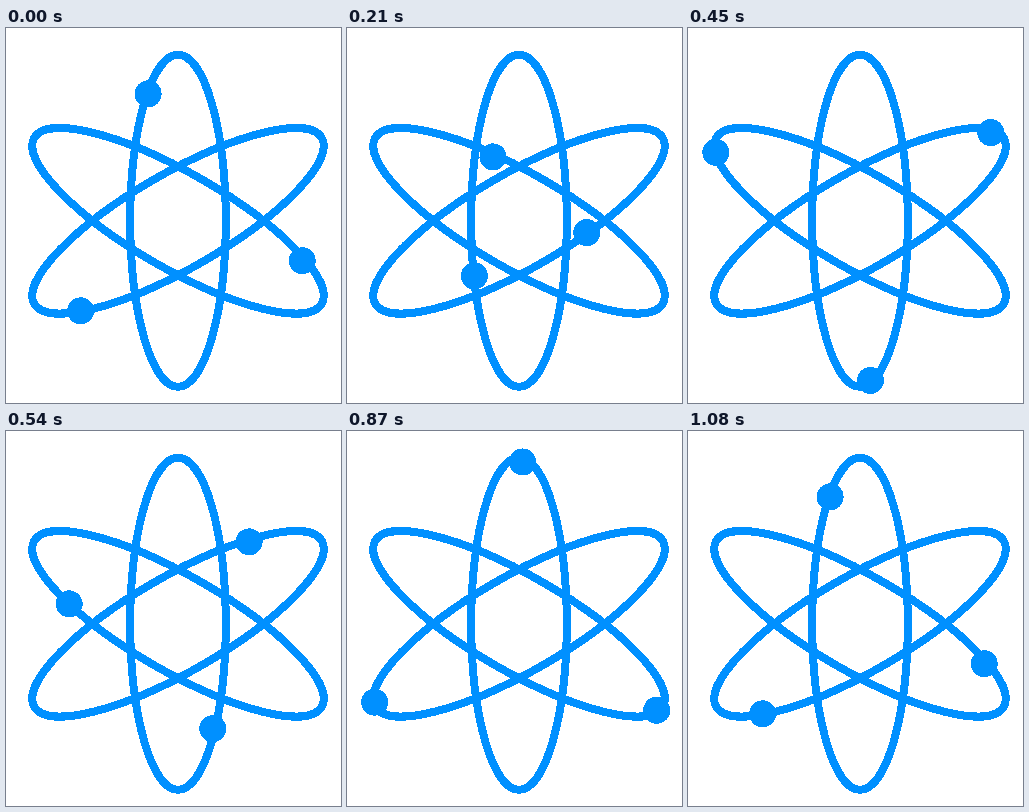
Animation, 335 px wide and 375 px high, one loop 1.11 s. Source, as an HTML page:

```html
<!DOCTYPE html>
<html lang="en">
<head>
<meta charset="utf-8">
<title>Atom</title>
<style>
  html, body { margin: 0; width: 100%; height: 100%; overflow: hidden; background: #fff; }
  svg { display: block; width: 335px; height: 375px; shape-rendering: crispEdges; }
</style>
</head>
<body>
<svg id="stage" viewBox="0 0 335 375"></svg>
<script>
const COLOR = '#0090ff';
const STEP = 30, LOOP = 1110, TURN = 36;
const TILTS = [0, 120, 240];
const ORBIT = { x: 172, y: 192.8, rx: 47.8, ry: 166 };
const TRACK = { x: 171, y: 193.8, rx: 46.3, ry: 163.7 };

// Electron phase in degrees at a few steps of one turn.
const KEYS = [[0, 38.6], [7, 109.3], [11, 150.4], [18, 230.6], [23, 300.2], [29, 354.2]];

const stage = document.getElementById('stage');

function add(parent, tag, attrs) {
  const node = document.createElementNS('http://www.w3.org/2000/svg', tag);
  for (const name in attrs) node.setAttribute(name, attrs[name]);
  return parent.appendChild(node);
}

function tilted({ x, y }, tilt) {
  return add(stage, 'g', { transform: `translate(${x} ${y}) rotate(${tilt})` });
}

const electrons = TILTS.map(tilt => {
  add(tilted(ORBIT, tilt), 'ellipse', {
    rx: ORBIT.rx, ry: ORBIT.ry, fill: 'none', stroke: COLOR, 'stroke-width': 8
  });
  return add(tilted(TRACK, tilt), 'circle', { r: 13.5, fill: COLOR });
});

// Keys repeat every turn, each time 360 degrees further.
function key(i) {
  const turns = Math.floor(i / KEYS.length);
  const [step, phase] = KEYS[i - turns * KEYS.length];
  return [step + turns * TURN, phase + turns * 360];
}

function slope(i) {
  const [a, b] = [key(i), key(i + 1)];
  return (b[1] - a[1]) / (b[0] - a[0]);
}

function tangent(i) {
  const before = key(i)[0] - key(i - 1)[0];
  const after = key(i + 1)[0] - key(i)[0];
  return (slope(i - 1) * after + slope(i) * before) / (before + after);
}

function phaseAt(step) {
  let i = 0;
  while (key(i + 1)[0] <= step) i++;
  const [start, from] = key(i), [end, to] = key(i + 1);
  const span = end - start, s = (step - start) / span;
  const ease = s * s * (3 - 2 * s);
  return from + (to - from) * ease
    + span * s * (1 - s) * (tangent(i) * (1 - s) - tangent(i + 1) * s);
}

function draw(time) {
  const step = Math.floor((time % LOOP) / STEP);
  const angle = phaseAt(step) * Math.PI / 180;
  for (const dot of electrons) {
    dot.setAttribute('cx', -TRACK.rx * Math.sin(angle));
    dot.setAttribute('cy', -TRACK.ry * Math.cos(angle));
  }
}

const begin = performance.now();
function tick() {
  draw(performance.now() - begin);
  requestAnimationFrame(tick);
}
tick();
</script>
</body>
</html>
```
